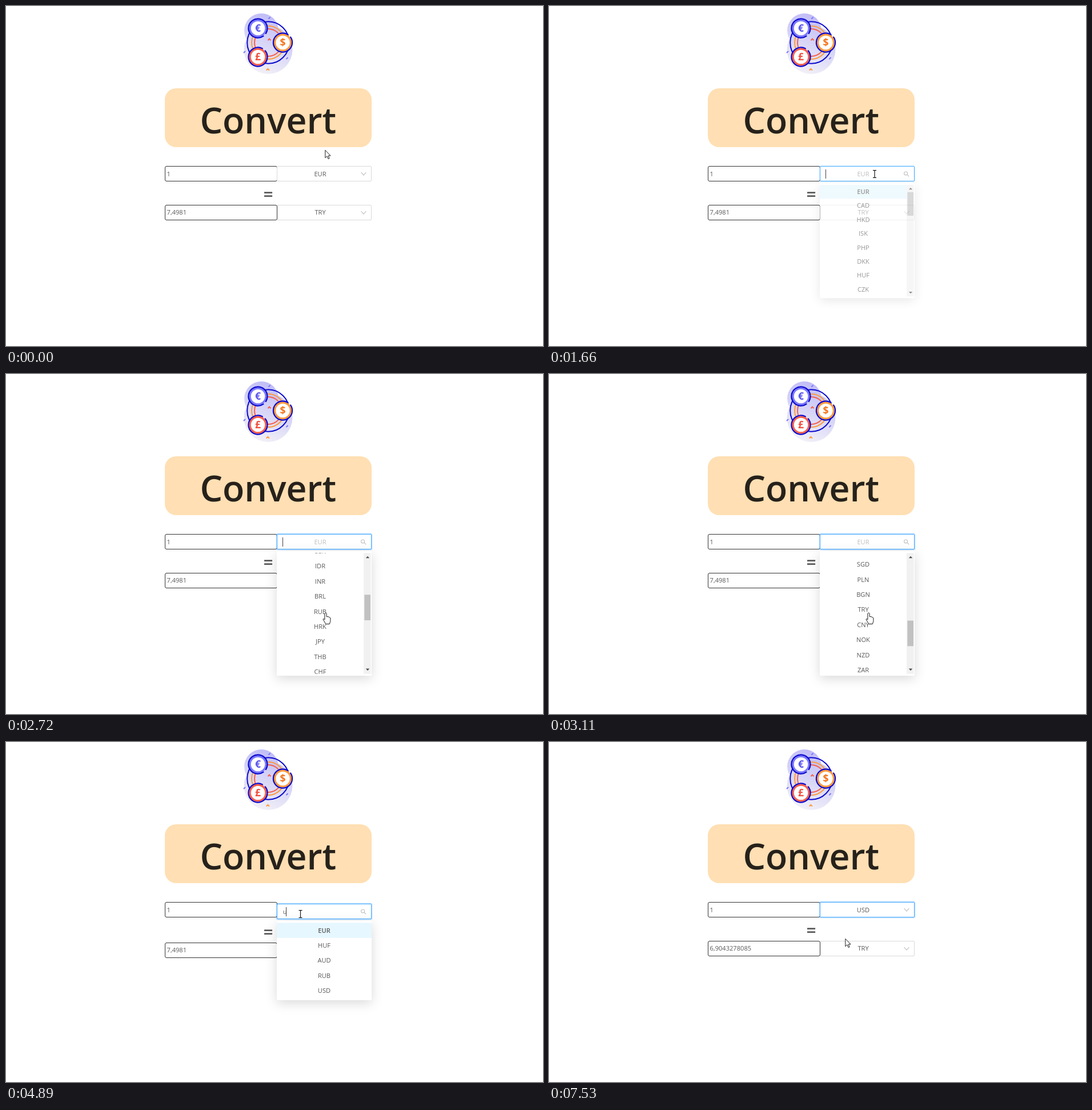
Write an HTML page that moves like this. It is 940 px wide and 595 px high and loops after 8000 ms.

```html
<!DOCTYPE html>
<html lang="en">
<head>
<meta charset="utf-8">
<title>Convert</title>
<style>
html, body { margin: 0; width: 100%; height: 100%; overflow: hidden; background: #fff; }
svg { display: block; width: 100%; height: 100%; }
text { font-family: "Open Sans", "Noto Sans", sans-serif; font-size: 11.1px; fill: #595959; }
.mid { text-anchor: middle; }
.title { font-size: 62.6px; font-weight: 600; fill: #26211b; }
.equals { font-size: 30px; font-weight: 600; }
.field { fill: #fff; stroke: #333; }
.select { fill: #fff; stroke: #d9d9d9; }
.icon { fill: none; stroke: #bfbfbf; stroke-width: 1.1; }
.panel { fill: #fff; filter: drop-shadow(0 5px 10px rgba(0, 0, 0, .15)); }
.picked { font-weight: 600; }
.coin { font-size: 17.5px; font-weight: 700; }
.line { fill: none; stroke-width: 2; stroke-linecap: round; }
</style>
</head>
<body>
<svg id="stage" viewBox="0 0 940 595"></svg>
<script>
const LOOP = 8000, ROW = 26.43, TOP = 310, PAD = 3.3, SHIFT = 3, NOTCH = 82.6;
const OPEN = 1590, TYPE_U = 4890, TYPE_S = 5040, PICK = 6580, BLINK = 497;
const NAVY = '#0b0bcf', ORANGE = '#ff9a3c', RED = '#f8604a', VIOLET = '#7b78fa';
const CODES = ('EUR CAD HKD ISK PHP DKK HUF CZK AUD RON SEK IDR INR BRL RUB HRK JPY ' +
  'THB CHF SGD PLN BGN TRY CNY NOK NZD ZAR USD MXN ILS GBP KRW MYR').split(' ');

// Pointer moves: when each starts and ends, and where it leads
const HOME = { x: 558.5, y: 252 };
const MOVES = [
  { from: 0, to: 300, x: 562, y: 241 },
  { from: 300, to: 850, x: 558.5, y: 302 },
  { from: 1400, to: OPEN, x: 570, y: 294 },
  { from: 1660, to: 2190, x: 559.5, y: 418 },
  { from: 3800, to: 4110, x: 515.5, y: 301 },
  { from: 6060, to: 6210, x: 524, y: 338 },
  { from: 7400, to: 7530, x: 518.5, y: 344 }
];

const ring = (x, y, r, color) => `<circle class="line" cx="${x}" cy="${y}" r="${r}" stroke="${color}"/>`;
const dash = (x, y, color) => `<path class="line" stroke="${color}" d="M${x} ${y}l2 -2"/>`;
const peak = (x, y, color) => `<path class="line" stroke="${color}" d="M${x - 2} ${y}l2 -2l2 2"/>`;

// The navy rim leaves a small gap just before the angle `turn`
function coin(x, y, sign, color, ink, turn) {
  return `<g transform="translate(${x} ${y})">
    <circle r="14" fill="#fff" stroke="${color}" stroke-width="3.4"/>
    <circle r="16.6" fill="none" stroke="${NAVY}" stroke-width="2.2" stroke-linecap="round"
      pathLength="100" stroke-dasharray="94 6" transform="rotate(${turn})"/>
    <text class="coin mid" y="6.3" style="fill:${ink}">${sign}</text></g>`;
}

function badge() {
  return `<g fill="url(#haze)"><circle cx="447" cy="43" r="30"/><circle cx="459" cy="76.5" r="42.5"/></g>` +
    ring(459, 64, 36.8, NAVY) + ring(459, 64, 29, ORANGE) + ring(459, 64, 24, RED) +
    peak(461, 59.5, RED) + peak(458.3, 112, ORANGE) +
    dash(460, 22, VIOLET) + dash(416.5, 81.5, VIOLET) + dash(491, 92.5, VIOLET) +
    coin(441, 39, '€', VIOLET, '#5751ee', 55) +
    coin(484.5, 64, '$', ORANGE, '#f4731c', -35) +
    coin(441, 89, '£', RED, '#f2503c', -40);
}

function menu(id, codes, active) {
  const scrolls = codes.length > 8, list = Math.min(codes.length, 8) * ROW;
  const cx = scrolls ? 550 : 557, y0 = TOP + PAD;
  const rows = codes.map((code, i) =>
    `<text class="mid ${code === 'EUR' ? 'picked' : ''}" x="${cx}" y="${y0 + ROW * (i + .5) + 4}">${code}</text>`);
  const bar = `<rect x="626" y="${y0}" width="12.6" height="${list}" fill="#f1f1f1"/>
    <rect id="thumb" x="627.4" width="10.6" height="44.7" fill="#c1c1c1"/>
    <path fill="#505050" d="M629.8 322.3h6.4l-3.2 -3.6zM629.8 515.6h6.4l-3.2 3.6z"/>`;
  return `<clipPath id="${id}Clip"><rect x="474" y="${y0}" width="166" height="${list}"/></clipPath>
    <g id="${id}"><rect class="panel" x="474" y="${TOP}" width="166" height="${list + 2 * PAD}" rx="1.5"/>
    <g clip-path="url(#${id}Clip)"><g id="${id}Rows">
      <rect x="474" y="${y0}" width="${scrolls ? 152 : 166}" height="${ROW}" fill="${active}"/>${rows.join('')}
    </g></g>${scrolls ? bar : ''}</g>`;
}

const field = y => `<rect class="field" x="278.5" y="${y}" width="196" height="26" rx="2.5"/>`;
const select = (y, id) => `<rect class="select" id="${id}" x="474.5" y="${y}" width="165" height="26" rx="1.5"/>`;
const chevron = (y, id) => `<path class="icon" id="${id}" d="M621.7 ${y}l4.3 5l4.3 -5"/>`;

document.getElementById('stage').innerHTML = `
  <defs><linearGradient id="haze" gradientUnits="userSpaceOnUse" x1="480" y1="20" x2="440" y2="119">
    <stop offset="0" stop-color="#bfbbf7"/><stop offset="1" stop-color="#f3f2f7"/></linearGradient></defs>
  ${badge()}
  <rect x="278" y="144" width="362" height="103" rx="20" fill="#ffdfb3"/>
  <text class="title mid" x="458.8" y="222.5">Convert</text>
  <g id="lower">
    <text class="equals mid" x="459" y="340.6">=</text>
    ${select(348.5, 'target')}${field(348.5)}${chevron(359.2, 'arrowTo')}
    <text id="result" x="281.6" y="365.3"></text>
    <text class="mid" x="550" y="365.3">TRY</text>
  </g>
  ${field(280.5)}<text x="281.6" y="297.5">1</text>
  <g id="upper">
    <rect id="glow" x="474" y="280" width="166" height="27" rx="2" fill="none" stroke="#1890ff" stroke-width="3"/>
    ${select(280.5, 'origin')}${chevron(291.2, 'arrowFrom')}
    <path class="icon" id="lens" d="M627.6 293a3 3 0 1 0 -6 0a3 3 0 1 0 6 0M626.8 295.2l3.4 3.2"/>
    <text class="mid" id="code" x="550" y="297.5"></text>
    <text id="typed" x="484.8" y="298"></text>
    <rect id="caret" y="286" width="1" height="16" fill="#404040"/>
  </g>
  ${menu('full', CODES, '#e6f7ff')}
  ${menu('some', ['EUR', 'HUF', 'AUD', 'RUB', 'USD'], '#e6f7ff')}
  ${menu('one', ['USD'], '#f5f5f5')}
  <g id="pointer" fill="#fff" stroke="#1a1a1a" stroke-linejoin="round">
    <path id="arrow" d="M.3 .3V13.7L3.4 10.8L5.6 15.6L7.6 14.7L5.5 10H9.6Z"/>
    <path id="beam" stroke-width="1.2" d="M-3 -6.4H3M0 -6.4V6.4M-3 6.4H3"/>
    <path id="hand" d="M-1.6 12V1.6a1.6 1.6 0 0 1 3.2 0V6.5q4 -.5 6.8 2.5V14.5l-1.6 5H.2l-4.6 -8q0 -2.5 2.8 .5z"/>
  </g>`;

const el = {};
document.querySelectorAll('#stage [id]').forEach(node => el[node.id] = node);

const ramp = (t, from, to) => Math.max(0, Math.min(1, (t - from) / (to - from)));
const smooth = u => u * u * (3 - 2 * u);
const set = (id, name, value) => el[id].setAttribute(name, value);
const show = (id, on) => set(id, 'visibility', on ? 'visible' : 'hidden');
const move = (id, x, y) => set(id, 'transform', `translate(${x} ${y})`);

function unfold(id, on, p, dy) {
  const s = .8 + .2 * p;
  show(id, on);
  set(id, 'opacity', p);
  set(id, 'transform', `translate(0 ${TOP * (1 - s) + dy}) scale(1 ${s})`);
}

function drawPointer(t) {
  let { x, y } = HOME;
  for (const m of MOVES) {
    const u = smooth(ramp(t, m.from, m.to));
    x += (m.x - x) * u;
    y += (m.y - y) * u;
  }
  const kind = y < 281 || t > 7440 ? 'arrow' : y < 309 ? 'beam' : 'hand';
  ['arrow', 'beam', 'hand'].forEach(k => show(k, k === kind));
  move('pointer', x, y);
}

function drawSelect(t, typed) {
  const searching = t >= OPEN && t < PICK;
  el.origin.style.stroke = t >= 620 ? '#40a9ff' : '#d9d9d9';
  set('glow', 'opacity', .25 * ramp(t, OPEN, OPEN + 250));
  show('arrowFrom', !searching);
  show('lens', searching);
  el.code.textContent = typed ? '' : t < PICK ? 'EUR' : 'USD';
  el.code.style.fill = searching ? '#bfbfbf' : '#595959';
  el.typed.textContent = typed;

  // Typing restarts the blink
  const blinkStart = t < TYPE_U ? OPEN : t < TYPE_S ? TYPE_U : TYPE_S;
  set('caret', 'x', 484 + 6 * typed.length);
  show('caret', searching && Math.floor((t - blinkStart) / BLINK) % 2 === 0);
}

function drawMenus(t, dy) {
  unfold('full', t >= 1626 && t < TYPE_U, 1 - (1 - ramp(t, 1626, 1826)) ** 5, 0);
  unfold('some', t >= TYPE_U && t < TYPE_S, 1, dy);
  unfold('one', t >= TYPE_S && t < 6750, 1 - ramp(t, PICK, 6750) ** 4, dy);

  // Six wheel notches, then two more to the end of the list
  const scroll = NOTCH * (6 * ramp(t, 2212, 3110) + 2 * ramp(t, 3560, 3840));
  move('fullRows', 0, -scroll);
  set('thumb', 'y', 327 + scroll / (CODES.length * ROW) * 184);
}

function draw(t) {
  const typed = t < TYPE_U || t >= PICK ? '' : t < TYPE_S ? 'u' : 'us';
  const dy = typed ? SHIFT : 0;
  move('upper', 0, dy);
  move('lower', 0, dy);
  el.result.textContent = t < 6660 ? '7,4981' : '6,9043278085';
  drawSelect(t, typed);
  drawMenus(t, dy);
  drawPointer(t);
}

const start = performance.now();
function tick() {
  draw((performance.now() - start) % LOOP);
  requestAnimationFrame(tick);
}
tick();
</script>
</body>
</html>
```
